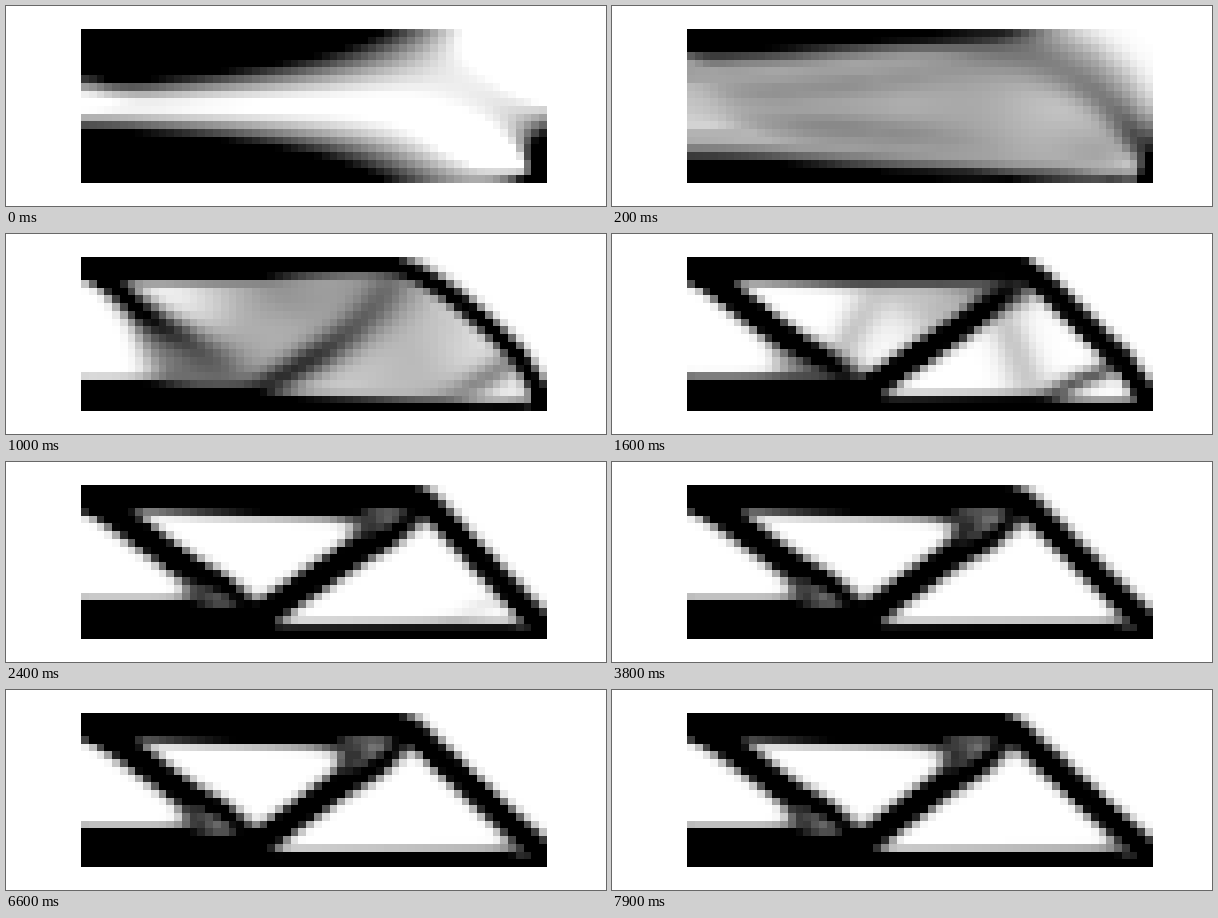
A matplotlib script for the animation above (8 s loop, 600x200 px).

```python
"""Topology optimisation of a half MBB beam, one design update per frame."""
import itertools
import numpy as np
import matplotlib.pyplot as plt
from matplotlib.animation import FuncAnimation

NX, NY = 60, 20
VOLFRAC, PENAL, RMIN = 0.5, 3.0, 1.5
E_MIN, MOVE = 1e-9, 0.2
FRAMES, INTERVAL = 80, 100
WIDTH, HEIGHT, DPI = 600, 200, 100


def element_stiffness(nu=0.3):
    """Unit plane-stress square by 2x2 Gauss quadrature.

    Node order: left top, left bottom, right top, right bottom.
    """
    sx, sy = np.array(list(itertools.product((-1, 1), (1, -1)))).T
    elastic = np.diag([1, 1, (1 - nu) / 2])
    elastic[0, 1] = elastic[1, 0] = nu
    elastic /= 1 - nu**2
    g = 1 / np.sqrt(3)
    ke = np.zeros((8, 8))
    for px, py in itertools.product((-g, g), repeat=2):
        dx, dy = sx * (1 + sy * py) / 2, sy * (1 + sx * px) / 2
        strain = np.zeros((3, 8))
        strain[0, 0::2] = strain[2, 1::2] = dx
        strain[1, 1::2] = strain[2, 0::2] = dy
        ke += strain.T @ elastic @ strain / 4
    return ke


KE = element_stiffness()


def rows(j):
    return slice(2*j, 2*j + 4)


def displacements(E):
    """Solve the block-tridiagonal system, one block per column of nodes."""
    n = 2 * (NY + 1)
    diag, off = np.zeros((NX + 1, n, n)), np.zeros((NX, n, n))
    for j in range(NY):
        e, s = E[:, j, None, None], rows(j)
        diag[:-1, s, s] += e * KE[:4, :4]
        diag[1:, s, s] += e * KE[4:, 4:]
        off[:, s, s] += e * KE[:4, 4:]
    # Symmetry on the left edge, roller at the bottom right corner.
    sym = np.arange(0, n, 2)
    diag[0, sym, sym] += 1e8
    diag[-1, -1, -1] += 1e8

    load = np.zeros(n)
    load[1] = -1
    steps = []
    for i in range(NX):
        sol = np.linalg.solve(diag[i], np.column_stack([off[i], load]))
        steps.append(sol)
        diag[i + 1] -= off[i].T @ sol[:, :-1]
        load = -off[i].T @ sol[:, -1]
    u = np.zeros((NX + 1, n))
    u[-1] = np.linalg.solve(diag[-1], load)
    for i in reversed(range(NX)):
        u[i] = steps[i][:, -1] - steps[i][:, :-1] @ u[i + 1]
    return u


def cone_sum(a):
    """Sum over neighbours, weighted by RMIN - distance."""
    r = int(RMIN)
    p = np.pad(a, r)
    total = np.zeros_like(a)
    for dx, dy in itertools.product(range(-r, r + 1), repeat=2):
        w = max(0, RMIN - np.hypot(dx, dy))
        total += w * p[r + dx:r + dx + NX, r + dy:r + dy + NY]
    return total


WEIGHT = cone_sum(np.ones((NX, NY)))


def update(x):
    """One optimality-criteria step with filtered sensitivities."""
    u = displacements(E_MIN + x**PENAL * (1 - E_MIN))
    energy = np.empty_like(x)
    for j in range(NY):
        ue = np.hstack([u[:-1, rows(j)], u[1:, rows(j)]])
        energy[:, j] = np.sum(ue @ KE * ue, axis=1)
    gain = PENAL * x**(PENAL - 1) * energy
    gain = cone_sum(x * gain) / WEIGHT / np.maximum(x, 1e-3)

    lo, hi = 0, 1e9
    while (hi - lo) / (hi + lo) > 1e-4:
        mid = (lo + hi) / 2
        new = np.clip(x * np.sqrt(gain / mid),
                      np.maximum(0, x - MOVE), np.minimum(1, x + MOVE))
        lo, hi = (mid, hi) if new.mean() > VOLFRAC else (lo, mid)
    return new


designs = []
x = np.full((NX, NY), VOLFRAC)
for _ in range(FRAMES):
    x = update(x)
    designs.append(x)

fig = plt.figure(figsize=(WIDTH / DPI, HEIGHT / DPI), dpi=DPI)
ax = fig.add_axes([75 / WIDTH, 23 / HEIGHT, 466 / WIDTH, 154 / HEIGHT])
ax.axis("off")
image = ax.imshow(-designs[0].T, cmap="gray", interpolation="nearest", aspect="auto")


def draw(i):
    image.set_data(-designs[i].T)
    image.autoscale()
    return [image]


anim = FuncAnimation(fig, draw, frames=FRAMES, interval=INTERVAL, repeat=True)
plt.show()
```
